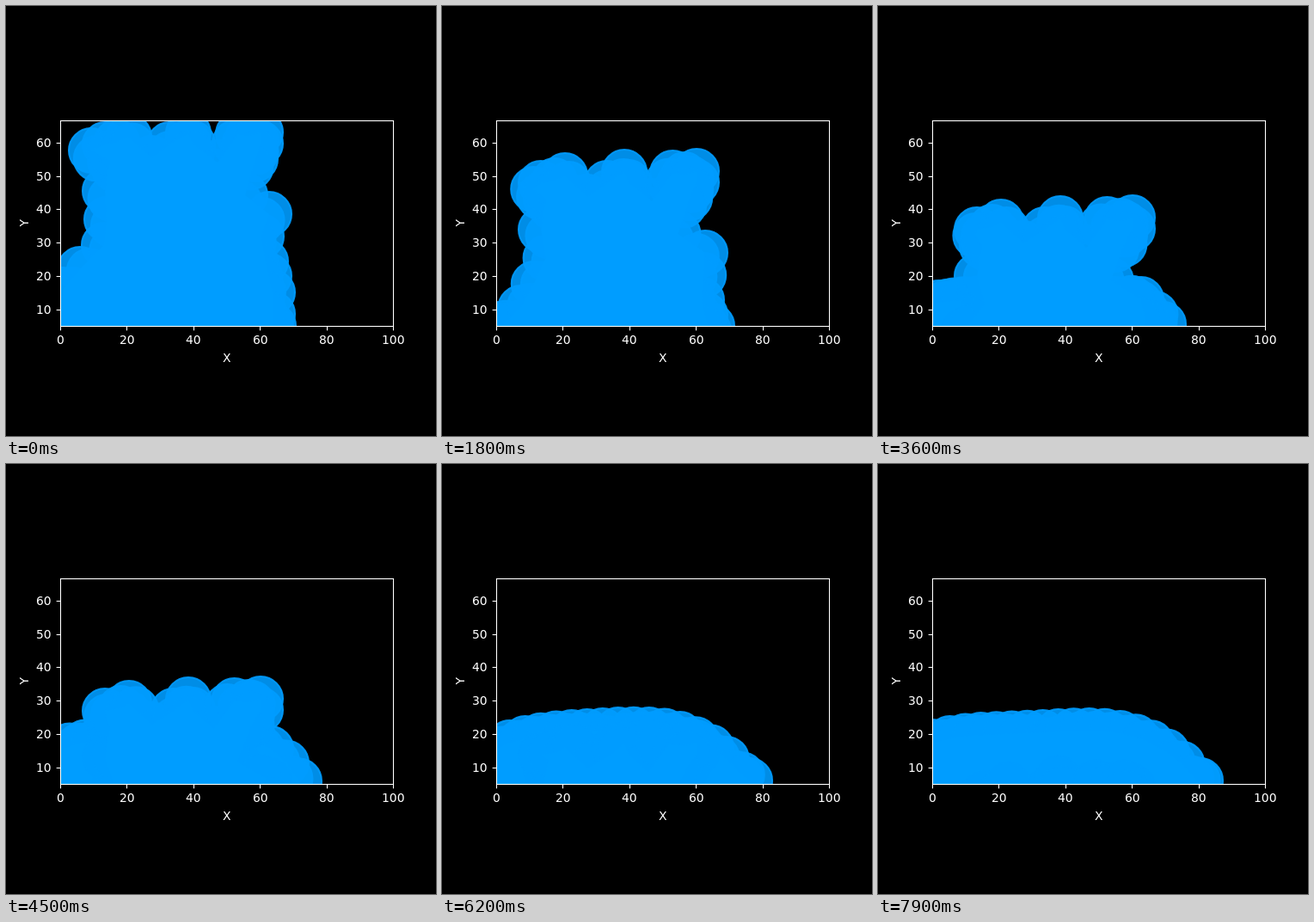
An HTML page with a canvas for the animation above (8 s loop, 500 by 500 pixels).

```html
<!DOCTYPE html>
<html>
<head>
<meta charset="utf-8">
<style>
html, body { margin: 0; height: 100%; overflow: hidden; background: #000; }
canvas { display: block; }
</style>
</head>
<body>
<canvas id="stage" width="500" height="500"></canvas>
<script>
const ctx = document.getElementById('stage').getContext('2d');
const LOOP = 8000, STEP = 100, RADIUS = 26;
const WATER = '#009dff';
const LEFT = 63.5, TOP = 133.5, RIGHT = 450.5, BOTTOM = 372.5, TICK = 4.86;

// Outline of the falling block: x, y and sideways speed in px/s
const block = [
  [66, 330], [86, 306, 3], [114, 278, -4], [117, 248, 2], [115, 215], [121, 180],
  [99, 168, 4], [115, 161], [129, 158, 1], [143, 152], [169, 177], [190, 161, 1],
  [212, 148], [217, 160], [246, 182, -1], [270, 149, -1], [282, 151], [296, 147],
  [296, 160], [290, 178, -1], [278, 220, -2], [306, 242], [297, 268, 4],
  [302, 297], [306, 314], [310, 333], [310, 358]
];

// Fall in px after t seconds: a soft start, then a steady speed
const drop = t => 30 * t - 9 * (1 - Math.exp(-t / 0.3));
const clamp = u => Math.min(1, Math.max(0, u));
const smooth = u => u * u * (3 - 2 * u);

function blockAt(t) {
  return block.map(([x, y, speed = 0]) => [x + speed * t, y + drop(t)]);
}

// The pool rises and spreads; its surface rounds off and drifts to the right.
function poolAt(t) {
  const middle = 185, gap = 18, drift = 24 * t;
  const edge = Math.max(311, 296 + 10 * t);
  const rise = smooth(clamp((t - 1.8) / 3.6));
  const power = 3.7 + 3.5 * Math.max(0, 5.4 - t);
  const points = [];
  let id = -Math.floor(drift / gap);
  for (let x = 20 + drift % gap; x < edge; x += gap, id++) {
    const u = clamp(Math.abs(x - middle) / (edge - middle));
    const height = 61 * (1 - u ** power) + 3 * Math.sin(id * 12.9);
    points.push([x, 372 - rise * height]);
  }
  points.push([edge, 372 - 4 * rise]);
  return points;
}

// A neighbour a little deeper inside the body
function inward([x, y]) {
  const dx = 200 - x, dy = 330 - y, d = Math.max(11, Math.hypot(dx, dy));
  return [x + 11 * dx / d, y + 11 * dy / d];
}

function particle([x, y]) {
  ctx.beginPath();
  ctx.arc(x, y, RADIUS, 0, 2 * Math.PI);
  ctx.fill();
  ctx.stroke();
}

function drawBody(outline) {
  ctx.globalAlpha = 0.9;
  outline.forEach(particle);
  outline.map(inward).forEach(particle);
  ctx.globalAlpha = 1;
  const [endX] = outline[outline.length - 1];
  ctx.beginPath();
  for (const p of [[LEFT, 500], ...outline, [endX, 500]]) ctx.lineTo(...p);
  ctx.fill();
}

function drawWater(t) {
  ctx.save();
  ctx.beginPath();
  ctx.rect(LEFT, TOP, RIGHT - LEFT, BOTTOM - TOP);
  ctx.clip();
  ctx.fillStyle = ctx.strokeStyle = WATER;
  ctx.lineWidth = 2.08;
  drawBody(poolAt(t));
  drawBody(blockAt(t));
  ctx.restore();
}

function line(x1, y1, x2, y2) {
  ctx.beginPath();
  ctx.moveTo(x1, y1);
  ctx.lineTo(x2, y2);
  ctx.stroke();
}

// Text on whole pixels; align 0.5 centres it on x, 1 ends it there
function label(text, x, y, align) {
  ctx.fillText(text, Math.round(x - align * ctx.measureText(text).width), y);
}

function drawAxes() {
  ctx.strokeStyle = ctx.fillStyle = '#fff';
  ctx.lineWidth = 1.1;
  ctx.font = '13.89px "DejaVu Sans", sans-serif';
  ctx.strokeRect(LEFT, TOP, RIGHT - LEFT, BOTTOM - TOP);
  for (let v = 0; v <= 100; v += 20) {
    const x = 62.5 + 3.875 * v, px = Math.round(x) + 0.5;
    line(px, BOTTOM, px, BOTTOM + TICK);
    label(v, x + 0.5, 393, 0.5);
  }
  for (let v = 10; v <= 60; v += 10) {
    const y = Math.round(391.45 - 3.875 * v);
    line(LEFT - TICK, y + 0.5, LEFT, y + 0.5);
    label(v, 52.8, y + 5, 1);
  }
  label('X', 256.75, 414, 0.5);
  ctx.save();
  ctx.translate(26, 252.5);
  ctx.rotate(-Math.PI / 2);
  label('Y', 0, 0, 0.5);
  ctx.restore();
}

const start = performance.now();
function frame() {
  const time = Math.floor((performance.now() - start) % LOOP / STEP) * STEP;
  ctx.fillStyle = '#000';
  ctx.fillRect(0, 0, 500, 500);
  drawWater(time / 1000);
  drawAxes();
  requestAnimationFrame(frame);
}
frame();
</script>
</body>
</html>
```
